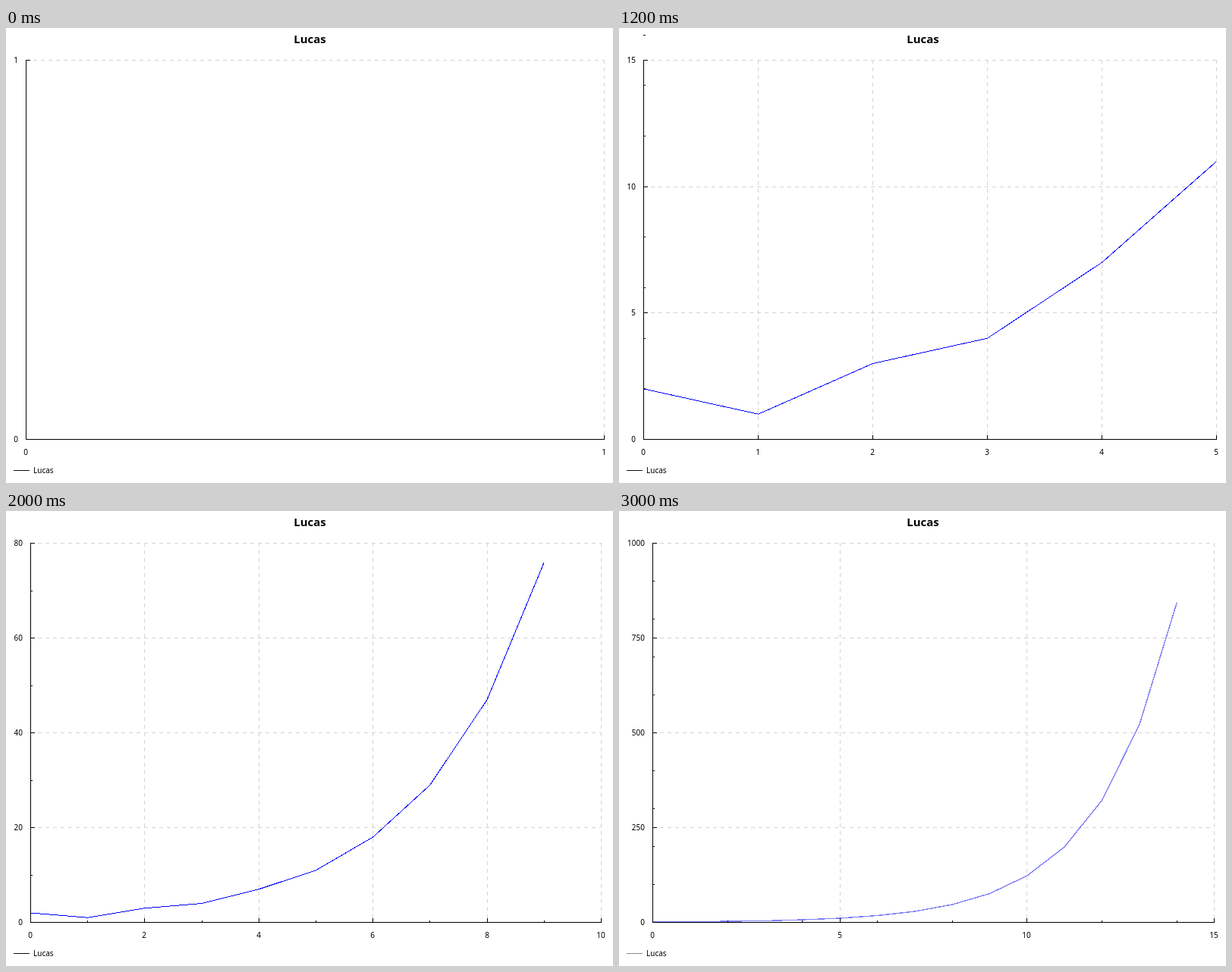
Write an HTML page that moves like this. It is 800 by 600 pixels and loops after 3200 ms.

```html
<!DOCTYPE html>
<html lang="en">
<head>
<meta charset="utf-8">
<title>Lucas</title>
<style>
html, body { margin: 0; width: 100%; height: 100%; overflow: hidden; background: #fff; }
svg { display: block; }
path { fill: none; stroke: #000; shape-rendering: crispEdges; }
text { font: 10px "Noto Sans", "Open Sans", sans-serif; }
.title { font-size: 15px; font-weight: bold; }
.mid { text-anchor: middle; }
.end { text-anchor: end; }
.grid { stroke: #d3d3d3; stroke-dasharray: 5 5; }
.line { stroke: #8080f8; stroke-width: 1.4; stroke-linejoin: round; }
.key { stroke: #888; }
.strong .line { stroke: #00f; stroke-width: 1; }
.strong .key { stroke: #111; }
.step { opacity: 0; animation: show 3.2s step-end infinite; }
@keyframes show { 0% { opacity: 1; } 6.25%, 100% { opacity: 0; } }
</style>
</head>
<body>
<svg id="stage" width="800" height="600" viewBox="0 0 800 600">
  <text class="title mid" x="400.5" y="20">Lucas</text>
  <text x="36" y="587">Lucas</text>
</svg>
<script>
const STEPS = 16, STEP_MS = 200, TOP = 42, BOTTOM = 542;
const STRONG = [0, 1, 6, 10, 11];
const SIZES = [1, 2, 5, 10, 20, 25, 50, 100, 200, 250, 500, 1000];

const lucas = [2, 1];
while (lucas.length < STEPS) lucas.push(lucas.at(-1) + lucas.at(-2));

// Round marks covering lo..hi, as near to the wanted count as possible
function marks(want, [lo, hi]) {
  let best;
  for (const size of SIZES) {
    const list = [], end = Math.ceil(hi / size) * size;
    for (let v = Math.floor(lo / size) * size; v <= end; v += size) list.push(v);
    const miss = Math.abs(list.length - want);
    if (best && best.miss <= miss) break;
    best = { list, miss };
  }
  return best.list;
}

function span(values) {
  if (!values.length) return [0, 1];
  const lo = Math.min(...values), hi = Math.max(...values);
  return lo === hi ? [lo - 1, lo + 1] : [lo, hi];
}

function axis(values) {
  const labels = marks(5, span(values));
  const lo = labels[0], hi = labels.at(-1);
  return { labels, ticks: marks(10, [lo, hi]), at: v => (v - lo) / (hi - lo) };
}

const path = (name, d) => `<path class="${name}" d="${d}"/>`;
const label = (name, x, y, v) => `<text class="${name}" x="${x}" y="${y}">${v}</text>`;

function chart(count) {
  const ys = lucas.slice(0, count);
  const xAxis = axis(ys.map((_, i) => i)), yAxis = axis(ys);
  const lastX = String(xAxis.labels.at(-1)), lastY = String(yAxis.labels.at(-1));
  const left = 20 + 6 * lastY.length;
  const right = lastX === "1" ? 788 : lastX.length > 1 ? 784 : 787;
  const px = v => left + (right - left) * xAxis.at(v);
  const py = v => BOTTOM - (BOTTOM - TOP) * yAxis.at(v);
  const col = v => Math.round(px(v)), row = v => Math.round(py(v));

  const grid = xAxis.labels.map(v => `M${col(v) + .5} ${TOP}V${BOTTOM}`).join("") +
    yAxis.labels.map(v => `M${left} ${row(v) + .5}H${right}`).join("");
  const line = ys.map((v, i) => `${i ? "L" : "M"}${px(i) + .5} ${py(v) + .5}`).join("");

  const xTicks = (list, size) => list.map(v => `M${col(v) + .5} ${BOTTOM + 1}v${-size}`).join("");
  const yTicks = (list, size) => list.map(v => `M${left} ${row(v) + .5}h${size}`).join("");
  const frame = `M${left + .5} ${TOP}V${BOTTOM + .5}H${right + 1}` +
    xTicks(xAxis.ticks, 3) + xTicks(xAxis.labels, 6) +
    yTicks(yAxis.ticks, 3) + yTicks(yAxis.labels, 6);

  return path("grid", grid) + (count > 1 ? path("line", line) : "") + path("axes", frame) +
    xAxis.labels.map(v => label("mid", col(v), 563, v)).join("") +
    yAxis.labels.map(v => label("end", left - 10, row(v) + 4, v)).join("") +
    path("key", "M10 583.5H31");
}

let content = "";
for (let i = 0; i < STEPS; i++) {
  const delay = (i - STEPS) * STEP_MS;
  content += `<g class="step${STRONG.includes(i) ? " strong" : ""}" style="animation-delay:${delay}ms">${chart(i)}</g>`;
}
document.getElementById("stage").insertAdjacentHTML("beforeend", content);
</script>
</body>
</html>
```
